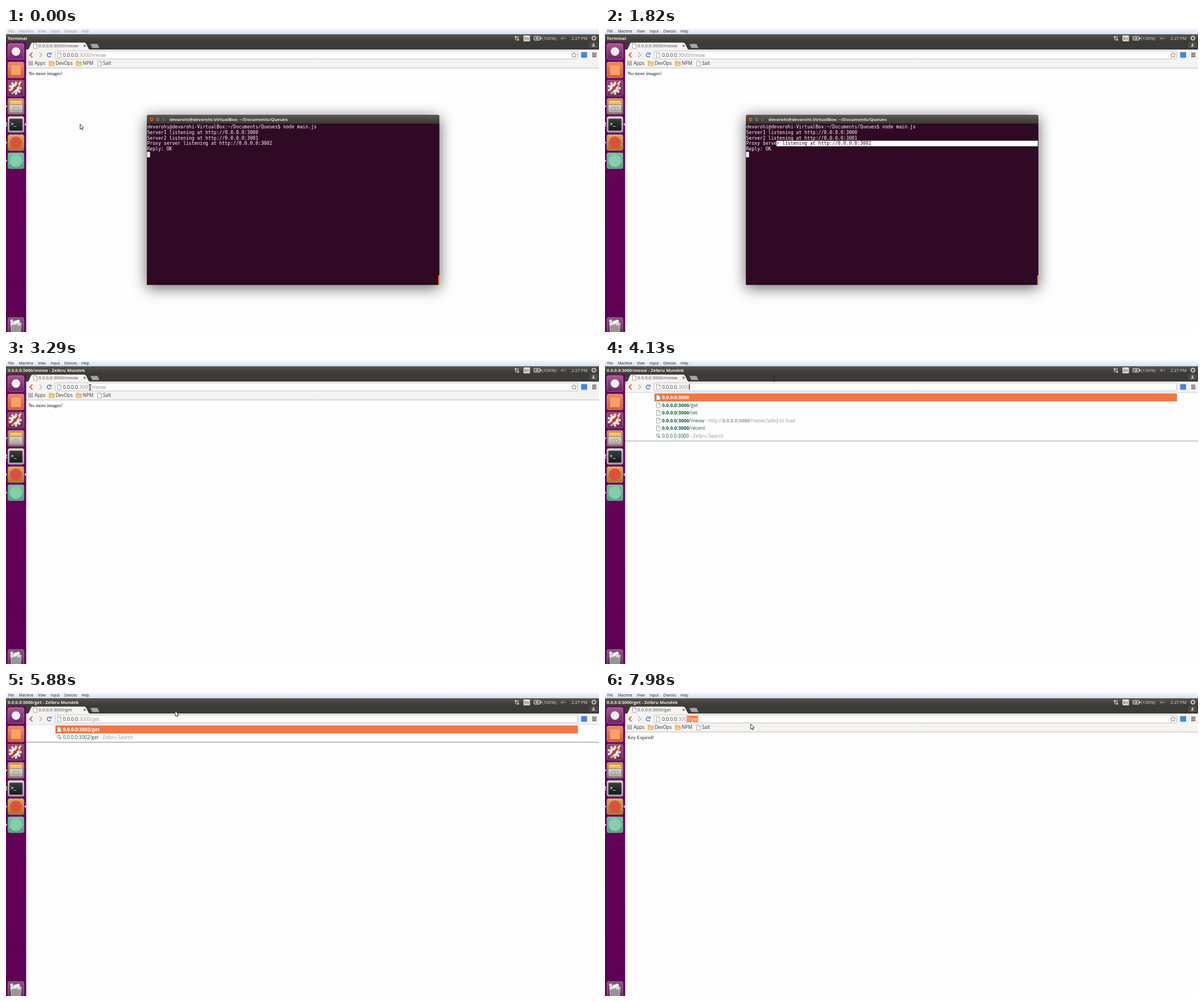
These frames come from a looping animation (1044x536 px, 8000 ms). An HTML page with a canvas:

```html
<!DOCTYPE html>
<html lang="en">
<head>
<meta charset="utf-8">
<title>Queue demo</title>
<style>
  html, body { margin: 0; width: 100%; height: 100%; overflow: hidden; background: #fff; }
  canvas { display: block; width: 1044px; height: 536px; }
</style>
</head>
<body>
<canvas id="stage" width="1044" height="536"></canvas>
<script>
const ctx = document.getElementById('stage').getContext('2d');
const LOOP = 8000, TICK = 70;
const SANS = '"Open Sans", "Noto Sans", sans-serif';
const SERIF = '"Liberation Serif", "Noto Serif", serif';
const MONO = '"DejaVu Sans Mono", "Noto Sans Mono", monospace';
const ORANGE = '#f07746', AUBERGINE = '#300a24', CHROME_BG = '#f4f3f2';
const USER = 'devarohi';
const BROWSER = 'Zelbru Mundek';

// ---- timeline ----
const RAISE = 3290, LOADED = 5880, SHOWN = 6020;

const cursorPath = [
  [0, 130, 169], [280, 417, 227], [770, 417, 227], [1260, 472, 205],
  [1330, 472, 205], [1750, 303, 203], [1820, 280, 201], [1890, 262, 196],
  [1960, 260, 195], [2030, 260, 195], [2100, 251, 197], [2170, 252, 198],
  [2380, 252, 198], [2590, 144, 42], [2800, 144, 42], [3220, 147.5, 48],
  [3290, 148, 48], [3430, 182, 45], [3640, 297.5, 33], [6370, 297.5, 33],
  [6720, 167.5, 42], [7210, 147.5, 48], [7350, 147.5, 48], [7630, 168, 46],
  [7840, 225, 51], [7980, 256, 56]
];

const urlSteps = [
  [0, '0.0.0.0:3000/meow'], [4130, '0.0.0.0:3000'], [4270, '0.0.0.0:300'],
  [4760, '0.0.0.0:3002'], [5250, '0.0.0.0:3002/get'], [LOADED, '0.0.0.0:3000/get']
];

// *bold*, | starts the grey description, ? marks a search row
const A = '*0.0.0.0:3000*', B = '*0.0.0.0:3002*';
const rowSteps = [
  [0, []],
  [4130, [A, A + '/get', A + '/set', A + `/meow| - http://${A}/meow failed to load`,
    A + '/recent', '?0.0.0.0:3000| - Zelbru Search']],
  [4270, ['*0.0.0.0:300*', '*0.0.0.0:300*0', '*0.0.0.0:300*0/get', '*0.0.0.0:300*0/set',
    '?0.0.0.0:300| - Zelbru Search']],
  [4760, ['0.0.0.0:3002', B + '/get', B + '/set', B + '/recent', '?0.0.0.0:3002']],
  [5040, [`0.0.0.0:3002| - http://${B}/ is not available`, B + '/get', B + '/set',
    B + '/recent', '?0.0.0.0:3002| - Zelbru Search']],
  [5250, ['*0.0.0.0:3002/get*', '?0.0.0.0:3002/get| - Zelbru Search']],
  [SHOWN, []]
];

const stepAt = (steps, t) => steps.filter(s => s[0] <= t).pop()[1];

function cursorAt(t) {
  const i = cursorPath.findIndex(k => k[0] > t);
  if (i < 0) return cursorPath[cursorPath.length - 1].slice(1);
  const [t0, x0, y0] = cursorPath[i - 1], [t1, x1, y1] = cursorPath[i];
  const f = (t - t0) / (t1 - t0);
  return [x0 + (x1 - x0) * f, y0 + (y1 - y0) * f];
}

// ---- drawing helpers ----
function rect(x, y, w, h, color) {
  ctx.fillStyle = color;
  ctx.fillRect(x, y, w, h);
}
function roundBox(x, y, w, h, r, fill, stroke) {
  ctx.beginPath();
  ctx.roundRect(x, y, w, h, r);
  paint(fill, stroke);
}
function disc(x, y, r, fill, stroke) {
  ctx.beginPath();
  ctx.arc(x, y, r, 0, 7);
  paint(fill, stroke);
}
function poly(points, fill, stroke, width = 1) {
  ctx.beginPath();
  points.forEach(p => ctx.lineTo(...p));
  ctx.closePath();
  paint(fill, stroke, width);
}
function line(points, color, width = 1) {
  ctx.beginPath();
  points.forEach(p => ctx.lineTo(...p));
  paint(null, color, width);
}
function paint(fill, stroke, width = 1) {
  if (fill) { ctx.fillStyle = fill; ctx.fill(); }
  if (stroke) { ctx.strokeStyle = stroke; ctx.lineWidth = width; ctx.stroke(); }
}
function shade(y0, y1, ...colors) {
  const g = ctx.createLinearGradient(0, y0, 0, y1);
  colors.forEach((c, i) => g.addColorStop(i / (colors.length - 1), c));
  return g;
}
function text(s, x, y, size, color, weight = 400, family = SANS) {
  ctx.font = `${weight} ${size}px ${family}`;
  ctx.fillStyle = color;
  ctx.fillText(s, x, y);
  return x + ctx.measureText(s).width;
}

function pageIcon(x, y) {
  poly([[x, y], [x + 4, y], [x + 6.5, y + 2.5], [x + 6.5, y + 9], [x, y + 9]], '#fff', '#9a9a9a', 0.9);
  line([[x + 4, y], [x + 4, y + 2.7], [x + 6.5, y + 2.7]], '#9a9a9a', 0.8);
}
function folderIcon(x, y) {
  poly([[x, y], [x + 3.5, y], [x + 4.5, y + 1.3], [x + 8.5, y + 1.3], [x + 8.5, y + 7.5], [x, y + 7.5]],
    '#fbdc9a', '#c98a35', 0.9);
  line([[x, y + 3], [x + 8.5, y + 3]], '#c98a35', 0.7);
}
function gear(x, y, r, color, teeth = 8) {
  for (let i = 0; i < teeth; i++) {
    const a = i * 2 * Math.PI / teeth, c = Math.cos(a), s = Math.sin(a);
    line([[x + c * r * 0.6, y + s * r * 0.6], [x + c * r, y + s * r]], color, r * 0.36);
  }
}

// ---- desktop ----
function menuBar(t) {
  rect(0, 0, 1044, 11, shade(0, 11, '#fafbfe', '#e6ecf7', '#d8e0f0'));
  const color = t < 490 ? '#93969c' : '#1c1c22';
  [['File', 4], ['Machine', 23], ['View', 56.3], ['Input', 78.8], ['Devices', 102.8], ['Help', 133]]
    .forEach(([s, x]) => text(s, x, 7.8, 6.3, color));
}

function topPanel(title) {
  rect(0, 11, 1044, 14, shade(11, 25, '#5b5950', '#45433d', '#3c3b37'));
  const light = '#dfdbd2';
  text(title, 3, 20.6, 7.75, '#f0ede6', 700);
  line([[897.5, 22], [897.5, 15]], light, 1.2);
  poly([[895, 17], [897.5, 13.5], [900, 17]], light);
  line([[901.5, 14], [901.5, 21]], light, 1.2);
  poly([[899, 20], [901.5, 23], [904, 20]], light);
  roundBox(911, 13, 11.5, 10.5, 1.5, light);
  text('En', 912.4, 21, 7.2, '#3c3b37');
  roundBox(929.5, 14.8, 11, 6.6, 1, '#6b6961', light);
  rect(941, 16.6, 1.6, 3, light);
  poly([[936, 15], [932.8, 18.6], [935, 18.6], [934, 21.4], [937.5, 17.6], [935.3, 17.6]], light);
  text('(100%)', 943.8, 20.6, 8, light);
  poly([[977, 16.7], [978.8, 16.7], [981, 14.5], [981, 21.5], [978.8, 19.4], [977, 19.4]], '#85827a');
  line([[982.5, 16.3], [985.5, 19.6]], '#85827a');
  line([[985.5, 16.3], [982.5, 19.6]], '#85827a');
  text('2:27 PM', 995.6, 20.6, 7.55, light);
  gear(1035, 18, 4.6, light);
  disc(1035, 18, 2.7, '#4b4942', light);
}

function tile(cy, top, bottom) {
  roundBox(3.5, cy - 14, 28, 28, 3, shade(cy - 14, cy + 14, top, bottom), 'rgba(255,255,255,.3)');
}

function launcher(browserActive) {
  rect(0, 25, 35.5, 511, shade(25, 536, '#660c5c', '#620257', '#5e0053'));
  tile(41.5, '#a35a92', '#6f2563');
  disc(17.5, 41.5, 7.5, '#f4eef2');

  tile(74, '#ec8a60', '#d05c30');
  rect(9, 66, 17, 17, '#f9a06a');

  tile(106, '#9b4a63', '#6a2a4c');
  gear(16, 106, 11.5, '#dedede', 9);
  disc(16, 106, 8, '#e8e8e8', '#b7b7b7');
  disc(16, 106, 3, '#8a4a60');
  line([[25, 96], [9, 114]], '#c53e27', 3.6);
  line([[26.5, 94.5], [22, 99.5]], '#e9e3e0', 3);

  tile(138, '#b29876', '#84694d');
  roundBox(6, 127, 23, 10, 1.5, '#f0a13f');
  rect(8, 129, 19, 2, '#fbe0a8');
  rect(7, 132, 21, 2, '#f7c46e');
  roundBox(5.5, 135, 24, 14.5, 1.5, shade(135, 149, '#dddad1', '#a9a59a'), '#7d786d');
  roundBox(13, 140, 9, 5, 1, '#f3f1ec', '#777');
  line([[15, 142.5], [20, 142.5]], '#666', 1.2);

  tile(170, '#d9d9d9', '#a4a4a4');
  roundBox(6, 160, 23, 21, 1.5, shade(160, 181, '#3a3c3a', '#171918'), '#6b6b6b');
  text('>_', 8.5, 172, 8.4, '#f2f2f2', 700, MONO);

  tile(202, '#dcae54', '#a9761f');
  disc(17.5, 202, 10.5, '#db5040');

  tile(234, '#72c39d', '#4ba57d');
  disc(17.5, 234, 11, '#86cdab');

  [138, 168, 172, 202, 234].forEach(y => poly([[0, y - 2], [2.4, y], [0, y + 2]], '#e8dbe6'));
  const y = browserActive ? 202 : 170;
  poly([[35, y - 2.6], [32.2, y], [35, y + 2.6]], '#e8dbe6');

  tile(524.5, '#865580', '#66305f');
  poly([[8, 520], [27, 520], [25, 537], [10, 537]], '#a3a0a4', '#d6d3d5');
  for (let i = 0; i < 9; i++) {
    disc(10 + (i * 5.3) % 15, 516.5 + (i * 3.7) % 6, 2.8, i % 2 ? '#f7f7f7' : '#dcdadb');
  }
  for (let i = 0; i < 5; i++) line([[10.5 + i * 3.6, 524], [11.5 + i * 3.1, 536]], '#7a767a', 0.9);
}

// ---- browser ----
function tabStrip(label) {
  rect(35, 25, 1009, 13.5, '#3c3b37');
  poly([[38, 38.5], [40.5, 36], [44, 27.5], [46, 25.8], [138.5, 25.8], [141, 27.5], [145, 36], [147.5, 38.5]], CHROME_BG);
  pageIcon(48.5, 27);
  text(label, 57.3, 34.3, 7.88, '#444');
  line([[136.8, 29.7], [140.2, 33.1]], '#555', 1.1);
  line([[140.2, 29.7], [136.8, 33.1]], '#555', 1.1);
  poly([[148.5, 28], [161, 28], [164.5, 35.2], [152, 35.2]], '#a9a7a3', '#6d6b66', 0.7);
  roundBox(1028, 25.5, 13, 9, 1.5, '#4b4943', '#5f5d56');
  disc(1034.3, 28.6, 1.4, '#dedbd4');
  rect(1032, 30.5, 4.6, 2, '#dedbd4');
}

const URL_X = 100.3, URL_SIZE = 8.56;
function urlX(url, i) {
  ctx.font = `400 ${URL_SIZE}px ${SANS}`;
  return URL_X + ctx.measureText(url.slice(0, i)).width;
}
function indexAt(url, x) {
  let i = 0;
  while (i < url.length && (urlX(url, i) + urlX(url, i + 1)) / 2 < x) i++;
  return i;
}

function urlSelection(t, url, x) {
  if (t >= 3360 && t < 4130) return [12, indexAt(url, x)];
  if (t >= 5250 && t < 5460) return [14, 16];
  if (t >= 7420) return [11, indexAt(url, x)];
  return [0, 0];
}

function toolbar(t, url, x, editing) {
  rect(35, 38, 1009, 19.5, CHROME_BG);
  line([[46.5, 43.2], [42.3, 47.5], [46.5, 51.8]], '#d9682f', 2);
  line([[59, 43.2], [63.2, 47.5], [59, 51.8]], '#c9c7c4', 2);
  ctx.beginPath();
  ctx.arc(76, 47.6, 3.4, 0.5, 5.4);
  paint(null, '#5b86c6', 1.7);
  poly([[76.2, 46.9], [80.2, 46.9], [80.2, 42.8]], '#5b86c6');
  roundBox(86.5, 40.5, 920, 14, 1.5, '#fff', '#c4c1bd');
  pageIcon(90.5, 43);

  text(url.slice(7), urlX(url, 7), 50.6, URL_SIZE, '#8a8a8a');
  text(url.slice(0, 7), URL_X, 50.6, URL_SIZE, '#2b2b2b');
  const [from, to] = urlSelection(t, url, x);
  if (to > from) {
    const left = urlX(url, from);
    rect(left, 42, urlX(url, to) - left, 11, ORANGE);
    text(url.slice(from, to), left, 50.6, URL_SIZE, '#fff');
  } else if (t >= 4130 && t < 5530 && !(t >= 5040 && t < 5250)) {
    rect(Math.round(urlX(url, url.length)), 42, 1, 11, '#222');
  }

  if (!editing) {
    const star = Array.from({ length: 10 }, (_, i) => {
      const a = -Math.PI / 2 + i * Math.PI / 5, r = i % 2 ? 2.3 : 5;
      return [1000 + r * Math.cos(a), 47.8 + r * Math.sin(a)];
    });
    poly(star, '#fff', '#777', 0.9);
  }
  rect(1012.5, 42.5, 10.5, 10, '#4285e4');
  [44.5, 47.5, 50.5].forEach(y => rect(1032, y - 0.8, 7.5, 1.6, '#4a4a4a'));
}

function bookmarks() {
  rect(35, 57, 1009, 13, CHROME_BG);
  rect(35, 70, 1009, 1, '#bfbcb8');
  const dots = ['#d9533f', '#4a7fd0', '#4aa35b'];
  for (let i = 0; i < 9; i++) {
    rect(39.5 + (i % 3) * 2.8, 58.5 + Math.floor(i / 3) * 2.8, 1.9, 1.9, dots[Math.floor(i / 3)]);
  }
  folderIcon(76.2, 58.6);
  folderIcon(124, 58.6);
  pageIcon(161.5, 58);
  [['Apps', 50.2], ['DevOps', 87.2], ['NPM', 135], ['Salt', 170.8]]
    .forEach(([s, x]) => text(s, x, 65.4, 8.3, '#3a3a3a'));
}

function suggestions(rows) {
  rect(35, 57, 1009, 479, '#fefefe');
  rect(35, 57, 1009, 0.8, '#cfcdca');
  rows.forEach((row, i) => {
    const mid = 66 + i * 13.58, search = row[0] === '?';
    if (!i) rect(87, 59, 920, 14, ORANGE);
    if (search) {
      disc(93, mid - 1, 2.5, null, '#777');
      line([[94.8, mid + 0.8], [97.5, mid + 3.4]], '#777', 1.4);
    } else pageIcon(90.5, mid - 4.5);
    let x = URL_X;
    row.replace('?', '').split('|').forEach((part, p) => {
      const color = !i ? '#fff' : p ? '#979797' : '#145a38';
      part.split('*').forEach((s, k) => {
        x = text(s, x, mid + 3, 8.4, color, k % 2 ? 700 : 400);
      });
    });
  });
  const end = 60.6 + rows.length * 13.6;
  rect(35, end, 1009, 1.2, '#a5a5a5');
  rect(35, end + 1.2, 1009, 1, '#e4e4e4');
}

// ---- terminal ----
const TERM = { x: 248, y: 153, w: 515, h: 300, top: 169.3, row: 9.8, col: 4.9 };
const output = [
  `${USER}@${USER}-VirtualBox:~/Documents/Queues$ node main.js`,
  'Server1 listening at http://0.0.0.0:3000',
  'Server2 listening at http://0.0.0.0:3001',
  'Proxy server listening at http://0.0.0.0:3002',
  'Reply: OK'
];

function terminal(t) {
  const { x, y, w, h, top, row, col } = TERM;
  ctx.save();
  ctx.shadowColor = 'rgba(0,0,0,.62)';
  ctx.shadowBlur = 26;
  ctx.shadowOffsetY = 5;
  roundBox(x, y, w, h, [4, 4, 0, 0], AUBERGINE);
  ctx.restore();
  roundBox(x, y, w, 15.5, [4, 4, 0, 0], shade(y, y + 15.5, '#5d5b52', '#4a4841', '#3d3c37'));
  disc(256.3, 161, 4, '#ee5f2b', '#35332e');
  line([[254.7, 159.4], [257.9, 162.6]], '#5a2412');
  line([[257.9, 159.4], [254.7, 162.6]], '#5a2412');
  disc(266.8, 161, 3.8, '#7d7b72', '#35332e');
  line([[265, 161], [268.6, 161]], '#3a3833');
  disc(277.2, 161, 3.8, '#7d7b72', '#35332e');
  ctx.strokeStyle = '#3a3833';
  ctx.strokeRect(275.7, 159.7, 3, 2.6);
  text(`${USER}@${USER}-VirtualBox: ~/Documents/Queues`, 287.7, 164, 7.8, '#e6e2d9', 700);

  const print = color => output.forEach((s, i) =>
    text(s, x + 0.4, top + i * row + 7.7, 8.14, color, 400, MONO));
  print('#fafafa');

  if (t >= 1400) {
    // the highlight trails the pointer by one tick
    const [mx, my] = cursorAt(Math.min(t - TICK, 2170));
    const headRow = Math.floor((my - top) / row);
    const headCol = Math.min(45, Math.floor((mx - x) / col));
    const right = x + w - 1;
    ctx.save();
    ctx.beginPath();
    for (let r = headRow; r <= 3; r++) {
      const c = r === headRow ? headCol : 0;
      if (c < 45) ctx.rect(x + c * col, top + r * row, right - x - c * col, row);
    }
    ctx.clip();
    rect(x, y, w, h, '#fff');
    print(AUBERGINE);
    ctx.restore();
  }
  rect(248.5, 218.3, 5, 9.6, '#fff');
  rect(761, 436, 2, 17, ORANGE);
}

// ---- pointer ----
function pointer(t, x, y) {
  const overTerm = t < RAISE && x > TERM.x && x < 763 && y > 168;
  const dragging = t >= RAISE && t < LOADED;
  const overField = y > 40 && y < 55;
  if (overTerm || dragging || overField) {
    const color = overTerm ? '#92928f' : '#222';
    line([[x, y - 4], [x, y + 4.5]], color);
    line([[x - 2, y - 4.5], [x + 2, y - 4.5]], color);
    line([[x - 2, y + 4.7], [x + 2, y + 4.7]], color);
  } else {
    const shape = [[0, 0], [0, 9], [2, 7.3], [3.3, 10.3], [4.9, 9.6], [3.6, 6.7], [6.2, 6.4]];
    poly(shape.map(p => [x + p[0] + 0.5, y + p[1] + 0.5]), '#fff', '#222', 0.9);
  }
}

function draw(t) {
  const url = stepAt(urlSteps, t), rows = stepAt(rowSteps, t);
  const [x, y] = cursorAt(t);
  const page = t < LOADED ? '0.0.0.0:3000/meow' : '0.0.0.0:3000/get';
  rect(0, 0, 1044, 536, '#fefefe');
  tabStrip(page);
  toolbar(t, url, x, rows.length > 0);
  if (rows.length) suggestions(rows);
  else {
    bookmarks();
    text(t < SHOWN ? 'No more images!' : 'Key Expired!', 39.7, 82.6, 8.64, '#111', 400, SERIF);
  }
  menuBar(t);
  topPanel(t < RAISE ? 'Terminal' : `${page} - ${BROWSER}`);
  launcher(t >= RAISE);
  if (t < RAISE) terminal(t);
  pointer(t, x, y);
}

let start, last = -1;
function frame(now) {
  start ??= now;
  const t = Math.floor((now - start) % LOOP / TICK) * TICK;
  if (t !== last) draw(last = t);
  requestAnimationFrame(frame);
}
requestAnimationFrame(frame);
</script>
</body>
</html>
```
